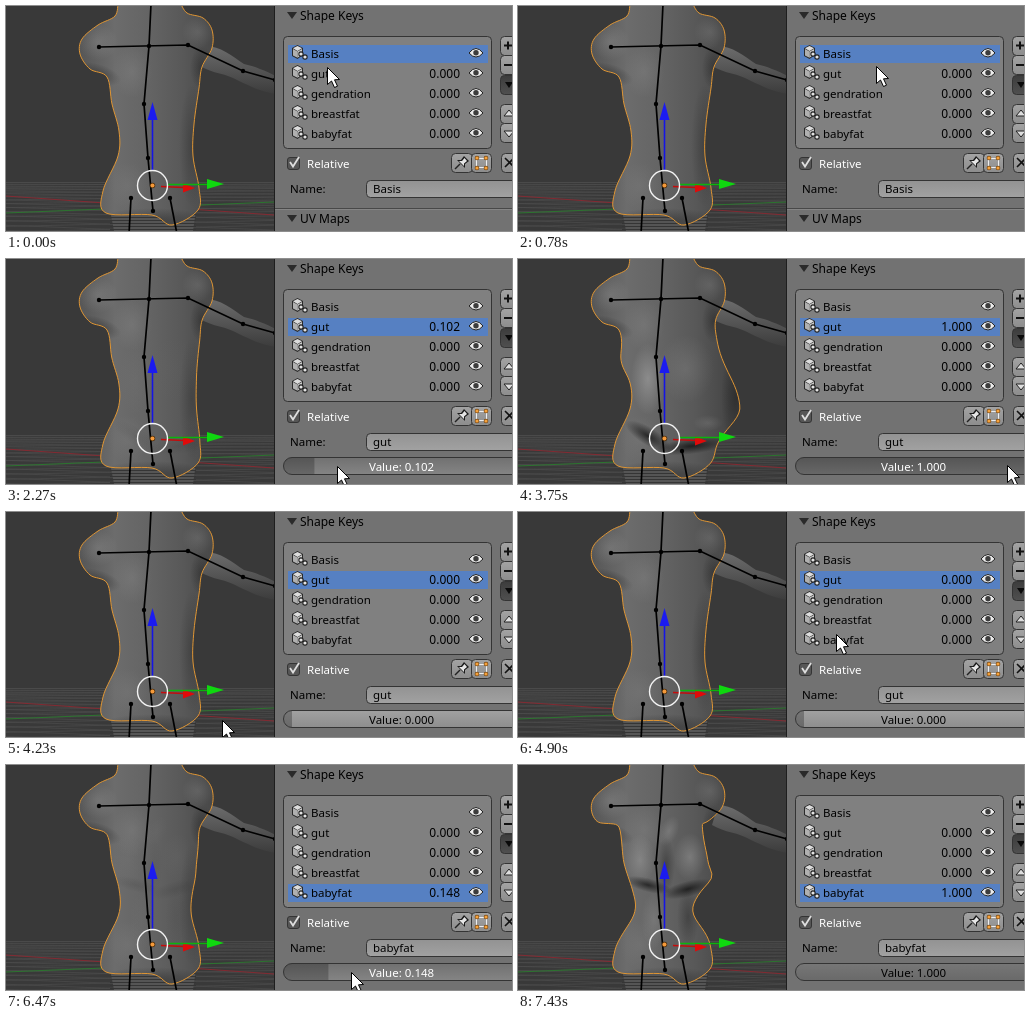
An HTML page with a canvas that plays this animation: 506 px wide and 225 px high, repeating every 8000 ms.

```html
<!DOCTYPE html>
<html lang="en">
<head>
<meta charset="utf-8">
<title>Shape keys</title>
<style>
html, body { margin: 0; width: 100%; height: 100%; overflow: hidden; background: #393939; }
canvas { display: block; width: 506px; height: 225px; }
</style>
</head>
<body>
<canvas id="stage"></canvas>
<script>
const W = 506, H = 225, LOOP = 8000, SLIDER = 307;
const canvas = document.getElementById('stage');
const dpr = window.devicePixelRatio || 1;
canvas.width = W * dpr;
canvas.height = H * dpr;
const c = canvas.getContext('2d');
const KEYS = ['Basis', 'gut', 'gendration', 'breastfat', 'babyfat'];

// Key points of the undeformed torso: left side down, right side up
const TORSO = [
  [112, -4], [109, 10], [92, 19], [76, 33], [74, 48], [84, 63], [101, 71], [106, 98], [113, 125], [112, 150], [97, 185], [100, 207],
  [146, 209], [166, 219],
  [192, 204], [193, 182], [187, 150], [188, 118], [193, 82], [196, 61], [206, 42], [206, 24], [197, 12], [181, 7], [174, -4]];

const clamp = v => Math.max(0, Math.min(1, v));
const phase = (t, a, b) => clamp((t - a) / (b - a));
const mix = (a, b, k) => a + (b - a) * k;
const bump = (y, mid, spread) => Math.exp(-(((y - mid) / spread) ** 2));
const pull = (t, a, b) => phase(t, a, b) ** 3.08;

// Chains moves: each starts where the last one ended
function travel(t, x, y, ...moves) {
  for (const [from, to, nx, ny] of moves) {
    const k = phase(t, from, to);
    x = mix(x, nx, k);
    y = mix(y, ny, k);
  }
  return [x, y];
}

function stateAt(t) {
  const s = { sel: t < 1010 ? 0 : t < 5560 ? 1 : 4, gut: 0, baby: pull(t, 6100, 6790) };
  s.drag = (t >= 1980 && t < 4230) || (t >= 6100 && t < 7430);
  if (t < 1980)
    [s.x, s.y] = travel(t, 321, 61, [30, 150, 324, 42], [360, 500, 425, 6], [500, 600, 462, 20],
      [600, 830, 330, 71], [1190, 1400, 317, 197], [1400, 1540, 292, 207], [1750, 1840, 299, 207]);
  else if (t < 3750) {
    s.gut = pull(t, 1980, 2590);
    [s.x, s.y] = [300 + SLIDER * s.gut, 207];
  } else if (t < 6100) {
    [s.x, s.y] = travel(t, 490, 206, [3750, 4080, 216, 208], [4230, 4990, 331, 111],
      [4990, 5080, 331, 109], [5240, 5350, 333, 124], [5740, 6100, 300, 207]);
    if (t < 4230) s.gut = clamp((s.x - 300) / 175);
  } else [s.x, s.y] = [300 + SLIDER * s.baby, 207];
  return s;
}

function line(color, width, ...p) {
  c.strokeStyle = color;
  c.lineWidth = width;
  c.beginPath();
  for (let i = 0; i < p.length; i += 2) c.lineTo(p[i], p[i + 1]);
  c.stroke();
}

function poly(color, ...p) {
  c.fillStyle = color;
  c.beginPath();
  for (let i = 0; i < p.length; i += 2) c.lineTo(p[i], p[i + 1]);
  c.closePath();
  c.fill();
}

function dot(x, y, r, color) {
  c.fillStyle = color;
  c.beginPath();
  c.arc(x, y, r, 0, 7);
  c.fill();
}

function text(s, x, y, { color = '#000', size = 11.5, align = 'left' } = {}) {
  c.font = size + 'px "Noto Sans", "Open Sans", sans-serif';
  c.fillStyle = color;
  c.textAlign = align;
  c.fillText(s, x, y);
}

function vgrad(y, h, top, bottom) {
  const g = c.createLinearGradient(0, y, 0, y + h);
  g.addColorStop(0, top);
  g.addColorStop(1, bottom);
  return g;
}

function box(x, y, w, h, r, fill) {
  c.beginPath();
  c.roundRect(x + .5, y + .5, w - 1, h - 1, r);
  c.fillStyle = fill;
  c.fill();
  c.strokeStyle = '#343434';
  c.lineWidth = 1;
  c.stroke();
}

// Soft ellipse, light (tone 170) or dark (tone 15)
function blob(tone, x, y, rx, ry, alpha, rot) {
  c.save();
  c.translate(x, y);
  c.rotate(rot);
  c.scale(rx, ry);
  const g = c.createRadialGradient(0, 0, 0, 0, 0, 1);
  g.addColorStop(0, `rgba(${tone},${tone},${tone},${alpha})`);
  g.addColorStop(1, `rgba(${tone},${tone},${tone},0)`);
  c.fillStyle = g;
  c.fillRect(-1, -1, 2, 2);
  c.restore();
}
const light = (x, y, rx, ry, a, rot = 0) => blob(170, x, y, rx, ry, a, rot);
const shade = (x, y, rx, ry, a, rot = 0) => blob(15, x, y, rx, ry, a, rot);

// Moves a silhouette point according to both shape keys
function deform([x, y], gut, baby) {
  const right = x > 146;
  const belly = right ? 35 * bump(y, 148, y < 148 ? 50 : 28) : -4 * bump(y, 105, 15);
  const slim = right
    ? 6 * bump(y, 112, 10) - 12 * bump(y, 145, 20) - 10 * bump(y, 68, 20)
    : 4 * bump(y, 145, 20);
  return [x + belly * gut + slim * baby, y - 9 * bump(y, 70, 9) * baby];
}

// Catmull-Rom point between p1 and p2
function curve(p0, p1, p2, p3, k) {
  return [0, 1].map(i => p1[i] + .5 * k * (p2[i] - p0[i]
    + k * (2 * p0[i] - 5 * p1[i] + 4 * p2[i] - p3[i]
    + k * (3 * (p1[i] - p2[i]) + p3[i] - p0[i]))));
}

function silhouette(gut, baby) {
  const at = i => TORSO[Math.max(0, Math.min(TORSO.length - 1, i))];
  c.beginPath();
  for (let i = 0; i < TORSO.length - 1; i++)
    for (let k = 0; k <= 1; k += .125)
      c.lineTo(...deform(curve(at(i - 1), at(i), at(i + 1), at(i + 2), k), gut, baby));
}

function floor() {
  for (let i = 0; i < 15; i++) {
    const y = 176.5 + i * 1.6 + i * i * .13;
    line('#4c4c4c', .7, 0, y, 268, y + i * .8);
    line('#4c4c4c', .7, 0, y + i * .5, 268, y);
  }
  line('#842a32', 1, 0, 190, 268, 209);
  line('#2c742f', 1, 0, 207, 268, 196);
}

function legs() {
  poly('#555', 104, 204, 190, 204, 187, 225, 108, 225);
  for (let y = 208.5; y < H; y += 3) line('#353535', 1, 104, y, 190, y);
}

function arm() {
  c.fillStyle = vgrad(42, 46, '#6a6a6a', '#3c3c3c');
  c.beginPath();
  c.moveTo(200, 40);
  c.bezierCurveTo(214, 40, 226, 50, 238, 58);
  c.bezierCurveTo(248, 60, 260, 65, 270, 70);
  c.lineTo(270, 88);
  c.bezierCurveTo(255, 86, 244, 80, 233, 75);
  c.bezierCurveTo(220, 67, 207, 68, 194, 60);
  c.fill();
}

function torso(g, b) {
  c.save();
  silhouette(g, b);
  const fill = c.createLinearGradient(74, 0, 212, 0);
  ['#565656', '#6c6c6c', '#646464', '#585858', '#454545'].forEach((v, i) => fill.addColorStop(i / 4, v));
  c.fillStyle = fill;
  c.fill();
  c.clip();
  light(92, 36, 20, 18, .25);
  light(192, 26, 16, 16, .2);
  shade(92, 68, 24, 10, .35, .3);
  shade(196, 62, 12, 22, .35);
  light(126, 66, 20, 26, .18);
  shade(147, 216, 60, 14, .4);
  light(122, 180, 20, 24, .12);
  shade(186, 140, 13, 62, .25 * (1 - Math.max(g, b)));

  c.globalAlpha = g;
  light(130, 120, 17, 36, .55);
  light(168, 110, 28, 34, .2);
  shade(218, 138, 15, 50, .4);
  shade(130, 177, 26, 9, .75, .55);
  shade(174, 187, 38, 8, .8, -.12);
  light(190, 164, 15, 8, .2);

  c.globalAlpha = b;
  light(122, 95, 15, 26, .42);
  light(172, 92, 16, 24, .4);
  light(151, 66, 9, 16, .3, .4);
  shade(148, 100, 9, 28, .35);
  shade(130, 120, 24, 7, .7, .25);
  shade(170, 124, 27, 8, .75, -.25);
  light(136, 155, 13, 28, .25);
  shade(170, 152, 11, 30, .3);
  c.globalAlpha = 1;
  c.restore();
  silhouette(g, b);
  c.strokeStyle = '#e09634';
  c.lineWidth = 1;
  c.stroke();
}

function bone(...p) {
  line('#000', 1.7, ...p);
  for (let i = 0; i < p.length; i += 2) dot(p[i], p[i + 1], 2.2, '#000');
}

function rig() {
  bone(145, -2, 143, 40, 138, 98, 142, 152, 147, 205);
  bone(93, 41, 182, 39, 237, 65, 269, 74);
  bone(125, 192, 123, 228);
  bone(164, 192, 171, 228);
}

function gizmo() {
  line('#1414e6', 1.6, 146.5, 164, 146.5, 113);
  poly('#1b1bf0', 146.5, 96, 151.5, 114, 141.5, 114);
  line('#c40c0c', 1.6, 155, 180.5, 178, 181.5);
  poly('#e00a0a', 189, 182, 177, 186.5, 177, 177.5);
  line('#0cb40c', 1.6, 162, 178.5, 202, 178.5);
  poly('#0fd80f', 218, 178, 201, 183, 201, 173);
  c.strokeStyle = '#f2f2f2';
  c.lineWidth = 1.4;
  c.beginPath();
  c.arc(146.5, 179.5, 15, 0, 7);
  c.stroke();
  dot(146.5, 179.5, 2.7, '#4d2d0a');
  dot(146.5, 179.5, 2, '#f59a3a');
}

function keyIcon(x, y) {
  poly('#2a2a2a', x - 1, y - 5, x + 4.5, y - 8, x + 10, y - 5, x + 10, y + 2, x + 4.5, y + 6, x - 1, y + 3);
  poly('#dcdcdc', x, y - 4.7, x + 4.5, y - 7, x + 9, y - 4.7, x + 4.5, y - 2);
  poly('#b0b0b0', x, y - 4, x + 4.5, y - 1.5, x + 4.5, y + 4.8, x, y + 2.4);
  poly('#cacaca', x + 4.5, y - 1.5, x + 9, y - 4, x + 9, y + 1.5, x + 4.5, y + 4.8);
  for (const [dx, dy] of [[8, 1], [12, 4]]) {
    dot(x + dx, y + dy, 2.7, '#222');
    dot(x + dx, y + dy, 1.6, '#e4e4e4');
  }
}

function eye(x, y) {
  c.beginPath();
  c.moveTo(x - 7, y);
  c.quadraticCurveTo(x, y - 9, x + 7, y);
  c.quadraticCurveTo(x, y + 8, x - 7, y);
  c.fillStyle = '#ececec';
  c.fill();
  c.strokeStyle = '#222';
  c.lineWidth = 1;
  c.stroke();
  dot(x, y - .3, 2.7, '#3c3c3c');
}

function header(label, y) {
  poly('#2a2a2a', 281, y - 8, 291, y - 8, 286, y - 1);
  text(label, 294, y, { size: 12 });
}

function button(x, y, w = 30) {
  box(x, y, w, 20, 4, vgrad(y, 20, '#a4a4a4', '#8c8c8c'));
}

function sideButtons() {
  for (const y of [30, 49, 98, 117]) button(494, y);
  button(495, 147);
  box(494, 69, 30, 20, 4, vgrad(69, 20, '#3c3c3c', '#505050'));
  line('#111', 2, 498, 39.5, 506, 39.5);
  line('#111', 2, 502, 35.5, 502, 43.5);
  line('#111', 2, 498, 59, 506, 59);
  poly('#0a0a0a', 499, 76, 507, 76, 503, 82);
  poly('#ddd', 498, 110, 503, 104, 508, 110);
  line('#222', 1, 508, 110, 498, 110, 503, 104, 508, 110);
  poly('#ddd', 498, 125, 508, 125, 503, 131);
  line('#222', 1, 508, 125, 498, 125, 503, 131, 508, 125);
  line('#111', 1.6, 499, 152, 508, 161);
  line('#111', 1.6, 499, 161, 508, 152);
}

function toggles() {
  box(281, 151, 13, 13, 2.5, '#565656');
  line('#dedede', 1.8, 284, 156, 287, 160.5, 293, 151);
  text('Relative', 301, 162, { color: '#fff' });
  button(445, 147, 22);
  button(465, 147, 21);
  line('#222', 1.5, 449, 163, 454, 158);
  poly('#1b1b1b', 451, 154, 455, 154, 458, 150, 463, 155, 459, 158, 459, 162);
  poly('#e6e6e6', 453, 155, 456, 155, 458.5, 152, 461, 155, 458, 157.5, 458, 160);
  c.strokeStyle = '#eee';
  c.lineWidth = 1;
  c.strokeRect(470.5, 152.5, 10, 9);
  for (const x of [471, 480]) for (const y of [152, 162]) {
    dot(x, y, 2.3, '#7a4a16');
    dot(x, y, 1.6, '#f5a23c');
  }
}

function slider(value, drag) {
  c.save();
  c.beginPath();
  c.roundRect(277.5, 198.5, SLIDER, 17, 8.5);
  c.fillStyle = drag ? vgrad(198, 18, '#707070', '#858585') : vgrad(198, 18, '#a2a2a2', '#8d8d8d');
  c.fill();
  c.save();
  c.clip();
  c.fillStyle = drag ? vgrad(198, 18, '#555', '#686868') : vgrad(198, 18, '#777', '#696969');
  c.fillRect(277, 198, Math.max(9, value * SLIDER), 18);
  c.restore();
  c.strokeStyle = '#343434';
  c.lineWidth = 1;
  c.stroke();
  c.restore();
  text('Value: ' + value.toFixed(3), 363, 212, { color: drag ? '#fff' : '#000' });
}

function panel(s) {
  const values = [0, s.gut, 0, 0, s.baby];
  c.fillStyle = '#727272';
  c.fillRect(269, 0, W - 269, H);
  c.fillStyle = '#1e1e1e';
  c.fillRect(268, 0, 1, H);
  header('Shape Keys', 14);
  box(277, 30, 209, 113, 4, '#808080');
  KEYS.forEach((name, i) => {
    const y = 38 + i * 20;
    if (i === s.sel) {
      c.fillStyle = '#5680c2';
      c.fillRect(282, y + 1, 200, 18);
    }
    keyIcon(287, y + 9);
    text(name, 305, y + 14);
    if (i) text(values[i].toFixed(3), 454, y + 14, { size: 12, align: 'right' });
    eye(470, y + 9);
  });
  sideButtons();
  toggles();
  text('Name:', 284, 187);
  box(360, 174, 170, 18, 4, vgrad(174, 18, '#929292', '#a2a2a2'));
  text(KEYS[s.sel], 367, 187);
  if (s.sel) slider(values[s.sel], s.drag);
  else {
    line('#484848', 1, 269, 202.5, W, 202.5);
    line('#858585', 1, 269, 203.5, W, 203.5);
    header('UV Maps', 217);
  }
}

function arrow(x, y) {
  c.save();
  c.translate(Math.round(x) + .5, Math.round(y) + .5);
  poly('#fff', 0, 0, 0, 17, 4, 13.5, 7, 20, 10, 18.7, 7, 12.3, 12, 12);
  c.strokeStyle = '#000';
  c.lineWidth = 1;
  c.stroke();
  c.restore();
}

function draw(t) {
  const s = stateAt(t);
  c.setTransform(dpr, 0, 0, dpr, 0, 0);
  c.fillStyle = '#393939';
  c.fillRect(0, 0, W, H);
  floor();
  legs();
  arm();
  torso(s.gut, s.baby);
  rig();
  gizmo();
  panel(s);
  arrow(s.x, s.y);
}

const start = performance.now();
function tick() {
  draw((performance.now() - start) % LOOP);
  requestAnimationFrame(tick);
}
tick();
</script>
</body>
</html>
```
